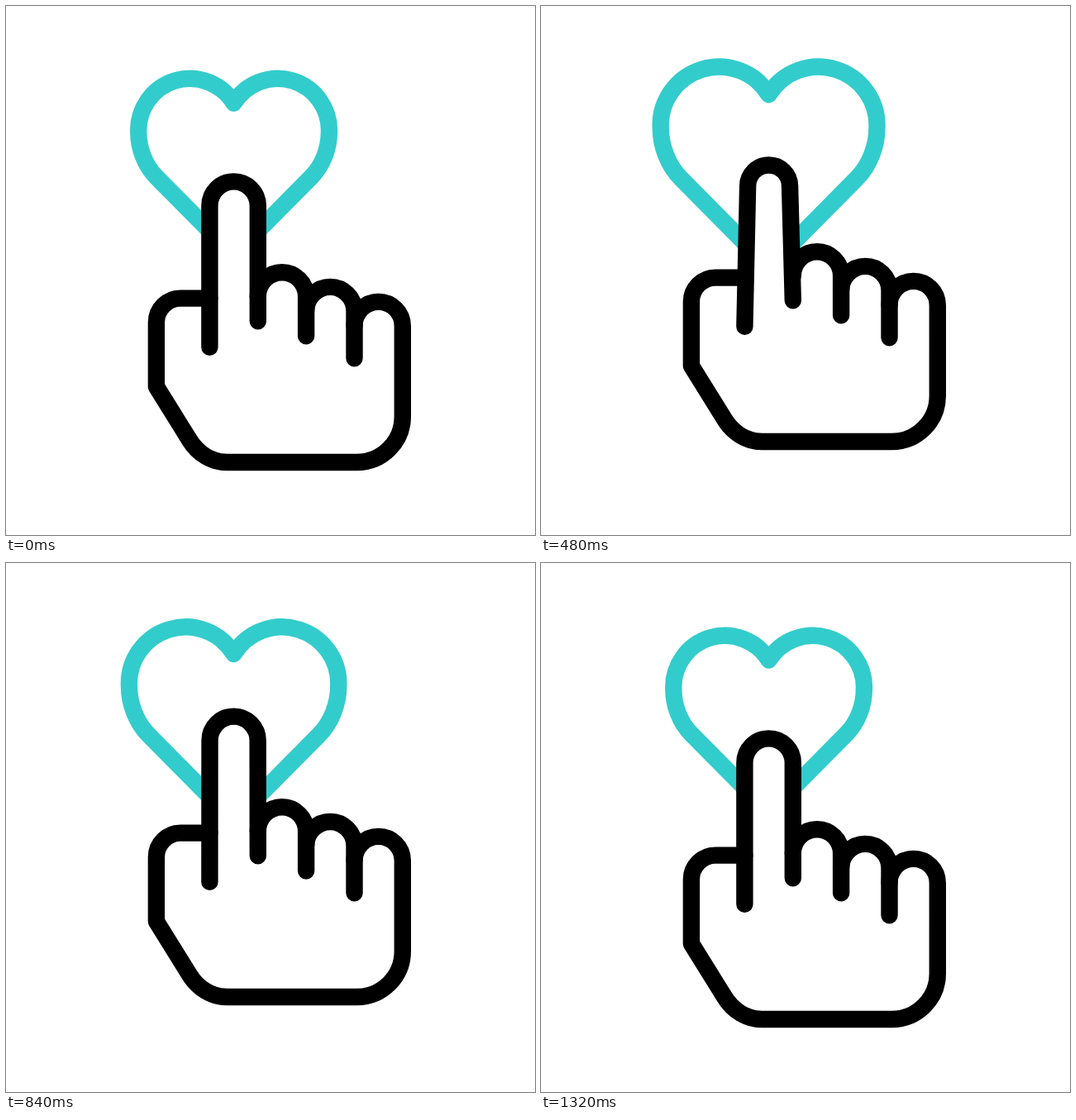
Animation of 640x640 px, one loop 1.4 s. Source, as an HTML page:

```html
<!DOCTYPE html>
<html lang="en">
<head>
<meta charset="utf-8">
<title>Tap to like</title>
<style>
  html, body { margin: 0; width: 100%; height: 100%; overflow: hidden; background: #fff; }
  svg { display: block; width: 100%; height: 100%; }
  path { fill: none; stroke: #000; stroke-width: 20.4; stroke-linecap: round; stroke-linejoin: round; }
  #heart { stroke: #3cc; vector-effect: non-scaling-stroke; }
  #finger { fill: #fff; }
</style>
</head>
<body>
<svg viewBox="0 0 640 640">
  <path id="heart" d="M275.6 117.5A62.3 62.3 0 0 0 160.3 153C160.3 172 168 193 182 207L275.6 301.5L369.2 207C383.2 193 390.9 172 390.9 153A62.3 62.3 0 0 0 275.6 117.5Z"/>
  <g id="hand">
    <path id="finger"/>
    <path d="M246.4 353.6H211A29.2 29.2 0 0 0 181.9 382.8V460.5L222 525C232 541.5 249 552 267.5 552H424.5A55.3 55.3 0 0 0 479.8 496.7V387A29.15 29.15 0 0 0 421.5 387V426.2"/>
    <path d="M363.1 399.4V369.1A29.2 29.2 0 0 1 421.5 369.1V387"/>
    <path d="M304.8 351.4A29.15 29.15 0 0 1 363.1 351.4V369"/>
  </g>
</svg>
<script>
  const LOOP = 1400, STEP = 40;
  const [heart, hand, finger] = ['heart', 'hand', 'finger'].map(id => document.getElementById(id));

  // Symmetric cubic-bezier(.56, 0, .44, 1)
  function ease(x) {
    let lo = 0, hi = 1, u = 0.5;
    for (let i = 0; i < 24; i++) {
      u = (lo + hi) / 2;
      const v = 1 - u;
      if (1.68 * u * v * v + 1.32 * u * u * v + u * u * u < x) lo = u;
      else hi = u;
    }
    return u * u * (3 - 2 * u);
  }

  // Rises from 0 to 1 between start and peak, then falls back by end
  function pulse(t, start, peak, end) {
    if (t <= start || t >= end) return 0;
    return ease(t < peak ? (t - start) / (peak - start) : (end - t) / (end - peak));
  }

  function draw(t) {
    const lift = 29.6 * pulse(t, 40, 680, 1320);
    const beat = 1 + 0.144 * (pulse(t, 323, 523, 723) + pulse(t, 723, 923, 1123));
    const press = 4.6 * pulse(t, 323, 560, 890);
    const r = 29.2 - press, y = 241.6 + 0.35 * press;

    heart.setAttribute('transform', `translate(275.6 194) scale(${beat}) translate(-275.6 -194)`);
    hand.setAttribute('transform', `translate(0 ${-lift})`);
    finger.setAttribute('d',
      `M246.4 412.8L${275.6 - r} ${y}A${r} ${r} 0 0 1 ${275.6 + r} ${y}L304.8 381.3`);
  }

  const start = performance.now();
  function tick() {
    const t = (performance.now() - start) % LOOP;
    draw(Math.floor(t / STEP) * STEP);
    requestAnimationFrame(tick);
  }
  tick();
</script>
</body>
</html>
```
